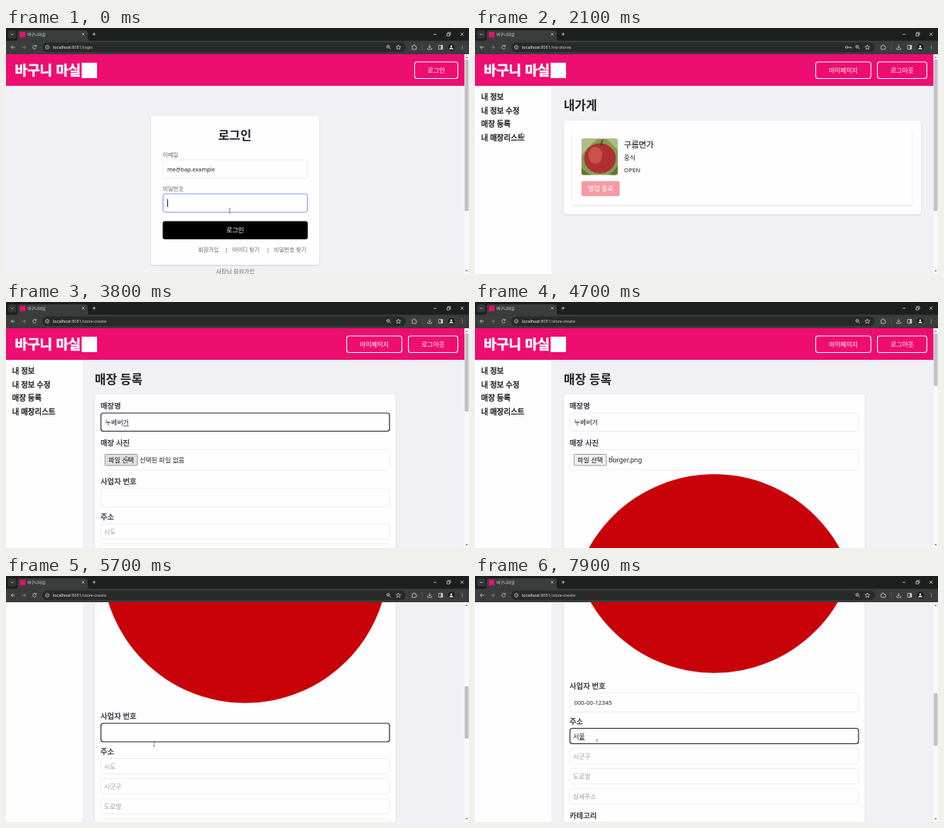
An HTML page that plays this animation: 600 by 319 pixels, repeating every 8000 ms.

```html
<!DOCTYPE html>
<html lang="ko">
<head>
<meta charset="utf-8">
<style>
html, body { margin: 0; width: 100%; height: 100%; overflow: hidden; background: #1d1e1e; }
svg { display: block; width: 600px; height: 319px; }
text { font-family: "Noto Sans", "Noto Sans CJK KR", sans-serif; white-space: pre; }
.ui { font-family: Roboto, "Noto Sans CJK KR", sans-serif; }
.shade { filter: drop-shadow(0 1px 1.2px rgba(40, 30, 60, .14)); }
.line { fill: none; stroke: #d6d6d6; stroke-width: .75; }
</style>
</head>
<body>
<svg id="stage" viewBox="0 0 600 319"></svg>
<script>
const LOOP = 8000, STEP = 100;
const PINK = '#ee0d70', INK = '#22222c', GRAY = '#66666e', PALE = '#9c9ca4', WHITE = '#fefdff', BACK = '#f1f0f4';
const BRAND = '바구니 마실', SHOP_NO = '000-00-12345';
const VIEW = 285, TRACK = 272, SHORT_PAGE = 395, FORM_PAGE = 767, PHOTO_H = 379;

// Times at which things happen, in ms
const T = {
  password: 150, submit: 1100, stores: 1500, leave: 2400, form: 2500, name: 2800,
  blur: 3900, photo: 4600, number: 5600, address: 7000, city: 7300
};
const NAME = ['', 'ㄴ', '누', '눕', '누베', '누벱', '누베버', '누베벅', '누베버거'];
const CITY = ['', 'ㅅ', '서', '성', '서우', '서울'];
const SCROLL = [[4700, 0], [5000, 235], [5400, 430], [6700, 430], [6900, 469]];
const POINTER = [
  [0, 290, 237], [600, 290, 236], [1000, 270, 267], [1500, 270, 267], [2100, 62, 139],
  [2300, 30, 127], [2900, 30, 127], [3600, 155, 182], [3800, 157, 203], [4500, 157, 203],
  [5000, 211, 203], [5400, 195, 203], [5700, 192, 218], [6300, 185, 250], [6700, 160, 246],
  [7000, 158, 208], [7900, 158, 215]
];

function at(keys, t) {
  const i = keys.findIndex(k => k[0] > t);
  if (i === 0) return keys[0].slice(1);
  if (i < 0) return keys[keys.length - 1].slice(1);
  const a = keys[i - 1], b = keys[i], f = (t - a[0]) / (b[0] - a[0]);
  return a.slice(1).map((v, j) => v + (b[j + 1] - v) * f);
}
const typed = (list, t, start) => list[Math.max(0, Math.min(list.length - 1, Math.floor((t - start) / 100) + 1))];

// y is the vertical middle of the letters
const text = (x, y, size, str, fill = INK, extra = '') =>
  `<text x="${x}" y="${y + size * .37}" font-size="${size}" fill="${fill}" ${extra}>${str}</text>`;
const rect = (x, y, w, h, fill, r = 0, extra = '') =>
  `<rect x="${x}" y="${y}" width="${w}" height="${h}" rx="${r}" fill="${fill}" ${extra}/>`;
const path = (d, extra = 'class="line"') => `<path d="${d}" ${extra}/>`;
const circle = (x, y, r, extra = 'class="line"') => `<circle cx="${x}" cy="${y}" r="${r}" ${extra}/>`;
const MID = 'text-anchor="middle"', BOLD = 'font-weight="700"';
const heavier = (color, width) => `stroke="${color}" stroke-width="${width}"`;

function box(x, y, w, h, color = '#ebeaef', width = .8) {
  return rect(x, y, w, h, WHITE, 3, `stroke="${color}" stroke-width="${width}"`);
}
const field = (y, h, focus) => focus ? box(123, y, 374, h, '#26262b', 1.15) : box(123, y, 374, h);
const caret = (x, y) => path(`M${x} ${y - 5}v10`, 'stroke="#111" stroke-width=".9"');

// Text in an input method: the last letter is underlined while it is composed
function composed(x, y, str, active) {
  const size = 8.4, adv = size * .92, end = x + str.length * adv;
  return text(x, y, size, str) +
    (active && str ? path(`M${end - adv} ${y + 5}h${adv}`, 'stroke="#222" stroke-width=".7"') : '');
}

function header(buttons) {
  return rect(0, 34, 594, 41, PINK) +
    text(11.5, 54.5, 17.6, BRAND, '#fff', 'font-weight="900" ' + heavier('#fff', .6)) +
    rect(98, 45, 20, 20, '#fff') +
    buttons.map(([x, w, label]) =>
      rect(x, 44, w, 21.5, 'none', 3, 'stroke="#fff" stroke-width="1.1"') +
      text(x + w / 2, 54.8, 8.2, label, '#fff', MID)).join('');
}
const memberPage = () => rect(0, 34, 99, 1200, '#fdfdfe') +
  header([[441.5, 71.5, '마이페이지'], [521.5, 64, '로그아웃']]) +
  ['내 정보', '내 정보 수정', '매장 등록', '내 매장리스트']
    .map((s, i) => text(8, 89.5 + i * 17.6, 9.7, s, '#111', heavier('#111', .35))).join('');

function loginPage(t) {
  const dots = Math.max(0, Math.min(4, Math.floor((t - T.password) / 150)));
  const focus = t < T.submit;
  let s = header([[529.5, 56, '로그인']]) +
    rect(188, 114, 218, 193, WHITE, 3, 'class="shade"') +
    text(296.5, 139.5, 15.6, '로그인', INK, BOLD + MID) +
    text(203, 164.5, 7.4, '이메일', GRAY) + box(203.5, 171, 187, 24) +
    text(209, 183.5, 7.3, 'me@bap.example') +
    text(203, 208, 7.4, '비밀번호', GRAY) +
    box(203.5, 215, 187, 24, focus ? '#7f9ce0' : undefined, focus ? 1 : .8);
  for (let i = 0; i < dots; i++) s += circle(210.5 + i * 3.6, 228, 1.25, 'fill="#111"');
  if (focus && t % 1000 < 500) s += caret(209.5 + dots * 3.6, 227);
  s += rect(203, 250.5, 188, 23.5, '#000', 3) + text(297, 262.3, 8.4, '로그인', '#fff', MID);
  [[249, '회원가입'], [283.5, '|'], [293, '아이디 찾기'], [337.5, '|'], [347, '비밀번호 찾기']]
    .forEach(([x, label]) => s += text(x, 287, 7.3, label, GRAY));
  return s + text(297, 316, 7.5, '사장님 회원가입', GRAY, MID);
}

function storesPage() {
  return memberPage() + text(115, 100, 15.6, '내가게', INK, BOLD) +
    rect(115, 120, 463, 121.5, WHITE, 3, 'class="shade"') +
    rect(126, 131, 440, 98.5, WHITE, 3, 'class="shade"') +
    '<clipPath id="photo"><rect x="138" y="143.5" width="47" height="47" rx="3"/></clipPath><g clip-path="url(#photo)">' +
    rect(138, 143, 48, 48, '#829c55') +
    path('M138 143h22l-14 12-8 10zM170 143h16v16z', 'fill="#aebd85"') +
    path('M138 182l12 9h-12zM186 178l-12 13h12z', 'fill="#5c7838"') +
    '<ellipse cx="162" cy="169" rx="20.5" ry="19.5" fill="#b02f32"/>' +
    '<ellipse cx="156" cy="165" rx="9" ry="11" fill="#c95349"/>' +
    path('M164 153q-1-5 2-8', 'fill="none" stroke="#553824" stroke-width="1.6"') + '</g>' +
    text(193, 151.5, 10.5, '구름면가', INK, heavier(INK, .2)) +
    text(193, 168, 8.2, '중식') + text(193, 184, 7.9, 'OPEN') +
    rect(138, 198.5, 49.5, 19.5, '#f49ba3', 2.5) + text(163, 208.3, 8.4, '영업 종료', '#fff', MID);
}

function formPage(t) {
  const photo = t >= T.photo, dy = photo ? PHOTO_H : 0;
  const nameFocus = t < T.blur, addressFocus = t >= T.address;
  const numberFocus = t >= T.number && !addressFocus;
  const digits = SHOP_NO.slice(0, Math.max(0, Math.floor((t - 5725) / 75)));
  const label = (y, str) => text(122.5, y, 9.6, str, INK, heavier(INK, .25));
  let s = memberPage() + text(115, 100, 15.7, '매장 등록', INK, BOLD) +
    rect(115, 120, 390, 1100, WHITE, 3, 'class="shade"') +
    label(134.3, '매장명') + field(144, 23.5, nameFocus) +
    composed(128.5, 155.8, typed(NAME, t, T.name), nameFocus) +
    label(182, '매장 사진') + field(191.5, 26.5) +
    rect(128.3, 197.5, 42, 14.5, t >= 3700 && !photo ? '#dfdfdf' : '#efefef', 1, 'stroke="#85858a" stroke-width=".8"') +
    text(149.3, 204.7, 8.4, '파일 선택', '#111', MID) +
    text(173, 204.7, 8.4, photo ? 'burger.png' : '선택된 파일 없음');
  if (photo) s += circle(310, 409, 185.7, 'fill="#c90109"');
  s += `<g transform="translate(0 ${dy})">` +
    label(232.3, '사업자 번호') + field(242, 24, numberFocus) + text(128.5, 254, 7.7, digits) +
    label(278, '주소');
  if (numberFocus && digits && t % 1000 < 500) s += caret(129.5 + digits.length * 4.1, 254);
  ['시도', '시군구', '도로명', '상세주소'].forEach((hint, i) => {
    const y = 287.5 + i * 26.1, city = i ? '' : typed(CITY, t, T.city);
    s += field(y, 20, !i && addressFocus) +
      (city ? composed(127, y + 10, city, true) : text(127, y + 10, 8.2, hint, PALE));
  });
  return s + label(400, '카테고리') + field(409, 24) + '</g>';
}

function scrollbar(height, scroll) {
  return rect(594, 34, 6, 285, '#f9f9fa') +
    rect(594.5, 41 + scroll * TRACK / height, 5, TRACK * VIEW / height, '#c0c0c1') +
    path('M595.3 39l1.7-2 1.7 2zM595.3 314l1.7 2 1.7-2z', 'fill="#77777a"');
}

function browser(url, loading, key) {
  return rect(0, 0, 600, 17, '#1d1e1e') + rect(2.5, 3, 11, 10.5, '#343535', 3) +
    path('M6.3 7.3l1.8 1.8 1.8-1.8') +
    path('M12 17q3 0 3-3V6q0-3 3-3h85q3 0 3 3v8q0 3 3 3z', 'fill="#3b3c3c"') +
    (loading ? '' : rect(18, 5, 7, 7, PINK)) +
    text(28, 8.2, 5, BRAND.replace(' ', ''), '#e4e4e4', 'class="ui"') +
    path('M98.5 6.5l3 3m0-3l-3 3M112 8h4.4m-2.2-2.2v4.4') +
    path('M554 8.2h4M571.5 7h3.3v3.3h-3.3zM572.7 7V5.8h3.3v3.3h-1.2M589 6l4 4m0-4l-4 4') +
    rect(0, 16.5, 600, 17.5, '#3b3c3c') + rect(47, 18.7, 471, 12.6, '#282929', 6.3) +
    path('M11.5 25H6.7m2.2-2.2L6.7 25l2.2 2.2') +
    path('M20.5 25h4.8m-2.2-2.2l2.2 2.2-2.2 2.2', 'class="line" opacity=".5"') +
    path(loading ? 'M35 23l4 4m0-4l-4 4' : 'M38.9 23.6a2.3 2.3 0 1 0 .3 2M39.2 22v1.9h-1.9') +
    circle(53.5, 25, 2.3) + path('M53.5 24.7v1.4M53.5 23.5v.5') +
    text(61, 25, 5.6, `localhost<tspan fill="#c4c5c6">:8081/${url}</tspan>`, '#eee', 'class="ui"') +
    (key ? circle(481.6, 25, 1.4) + path('M483 25h4.5v1.5m-1.6-1.5v1.2') : '') +
    circle(495.3, 24.3, 1.8) + path('M496.7 25.7l2 2M494.4 24.3h1.8') +
    path('M508.5 22l.9 2 2.1.2-1.6 1.4.5 2.1-1.9-1.1-1.9 1.1.5-2.1-1.6-1.4 2.1-.2z') +
    path('M526.3 23.2h1.6q0-1.3 1-1.3t1 1.3h1.3v1.5q1.2 0 1.2 1t-1.2 1v1.1h-4.9z') +
    path('M539.5 21v8', 'stroke="#5a5b5c" stroke-width=".7"') +
    path('M549 22v3.8m-1.7-1.7l1.7 1.7 1.7-1.7M546.3 26v1.7h5.4V26') +
    path('M560.7 22.5h5v5h-5z') + rect(563.6, 22.5, 2.2, 5, '#d6d6d6') +
    circle(577, 25, 4.4, 'fill="#1b1c1d"') + circle(577, 23.8, 1.3, 'fill="#f0f0f0"') +
    path('M574.3 27.6q0-2 2.7-2t2.7 2z', 'fill="#f0f0f0"') +
    [23, 25, 27].map(y => circle(591.3, y, .6, 'fill="#d6d6d6"')).join('');
}

function pointer(t) {
  const [x, y] = at(POINTER, t);
  const beam = t < 800 || t >= 5400;
  const hand = t >= 1000 && t < 1500;
  const edge = 'fill="#fff" stroke="#222" stroke-width=".55"';
  const shape = beam
    ? path('M-1.3-2.7h2.6M0-2.7v5.4M-1.3 2.7h2.6', 'stroke="#555" stroke-width=".6"')
    : hand
      ? path('M-1-3q.8-.5 1 .3V-.6l2 .5q.7.3.5 1.2L2 3H-.5L-2.2.6q.2-.8 1.2 0z', edge)
      : path('M-1.5-3.3v5.8l1.3-1.2 1 2.1.9-.4-.9-2h1.7z', edge);
  return `<g transform="translate(${x} ${y})">${shape}</g>`;
}

function draw(t) {
  const onForm = t >= T.form, onStores = t >= T.stores && !onForm;
  const scroll = onForm ? at(SCROLL, t)[0] : 0;
  const height = onForm ? FORM_PAGE + (t >= T.photo ? PHOTO_H : 0) : SHORT_PAGE;
  const page = onForm ? formPage(t) : onStores ? storesPage() : loginPage(t);
  const url = onForm ? 'store-create' : onStores ? 'my-stores' : 'login';
  const loading = t >= T.submit && t < 1700 || t >= T.leave && t < 2600;
  return rect(0, 34, 600, 285, BACK) +
    `<g transform="translate(0 ${-scroll})">${page}</g>` +
    scrollbar(height, scroll) + browser(url, loading, t >= 300 && !onForm) + pointer(t);
}

const stage = document.getElementById('stage');
let shown = -1;
function tick() {
  const t = Math.floor(performance.now() % LOOP / STEP) * STEP;
  if (t !== shown) stage.innerHTML = draw(shown = t);
  requestAnimationFrame(tick);
}
tick();
</script>
</body>
</html>
```
